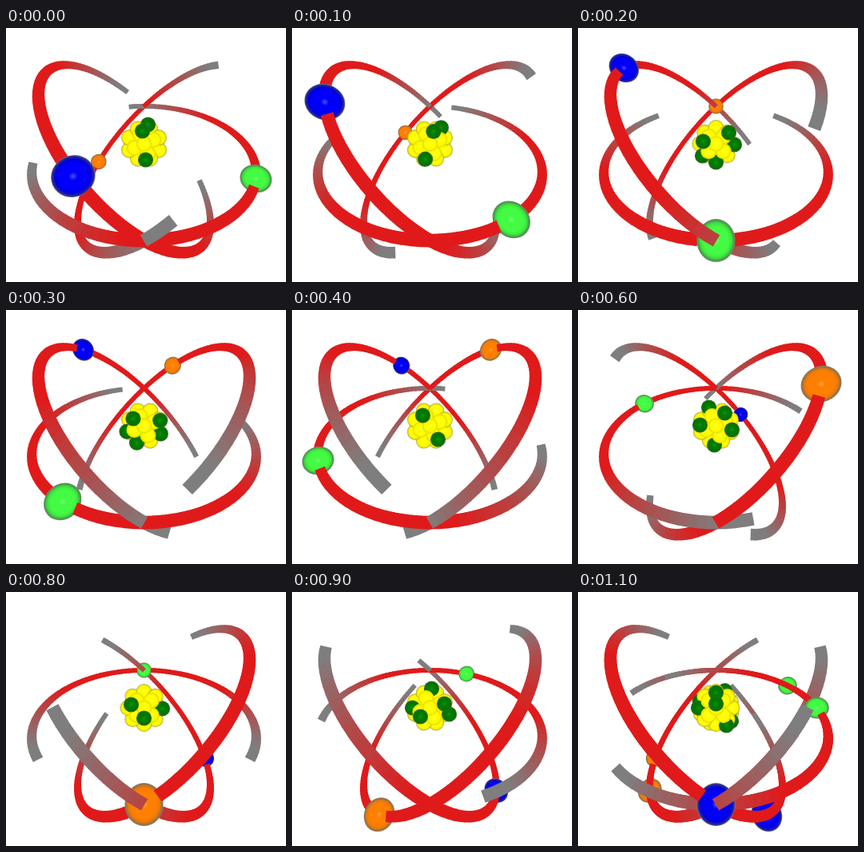
An HTML page with a canvas for the animation above (1.2 s loop, 350 px wide and 318 px high).

```html
<!DOCTYPE html>
<html lang="en">
<head>
<meta charset="utf-8">
<title>Atom</title>
<style>
  html, body { margin: 0; width: 100%; height: 100%; overflow: hidden; background: #fff; }
  canvas { display: block; }
</style>
</head>
<body>
<canvas id="stage" width="350" height="318"></canvas>
<script>
const ctx = document.getElementById('stage').getContext('2d');
const CX = 172.5, CY = 145, FOCAL = 241;
const BALL = 13.5, TUBE = 8.4, REACH = 132, STEP = 3;
const rad = deg => deg * Math.PI / 180;

// Every orbit shares the axis that points at the viewer; z is in focal lengths.
const AXIS = [0, 67.8, 0.44];
const orbits = [
  { side: [-126, 0, 0], start: -60,
    paint: ['#6cff6c', '#44fb44', '#3fe53f', '#469a46'] },
  { side: [-91.5, -75.5, 0.205], start: 30,
    paint: ['#5050ff', '#0000fa', '#0000dc', '#2c2c92'] },
  { side: [-91.5, 75.5, -0.205], start: 120,
    paint: ['#ffa040', '#ff8000', '#ee7a08', '#9c703c'] }
];

// Dark nucleons, as x, y pairs around the centre.
const poses = {
  0: [-2, -16, 5, -24, 2, 20],
  2: [16, -14, -16, -3, 0, 23, -17, 15, 23, 1],
  4: [-9, -13, 10, 17],
  6: [11, -16, -20, -1, 20, 5, -9, -23, -2, 24],
  8: [-16, -4, 0, 13, 23, 1],
  9: [18, -5, -12, 11, 2, -24, -22, 0, 24, 8],
  11: [0, -19, 0, -5, -22, 0, 13, 22]
};

function project(side, deg) {
  const c = Math.cos(rad(deg)), s = Math.sin(rad(deg));
  const [x, y, z] = AXIS.map((a, i) => a * c + side[i] * s);
  const scale = 1 / (1 - z);
  return { x: x * scale, y: y * scale, z, scale };
}

function sphere(x, y, r, stops) {
  const g = ctx.createRadialGradient(x, y, 0, x, y, r);
  stops.forEach(([at, color]) => g.addColorStop(at, color));
  ctx.fillStyle = g;
  ctx.beginPath();
  ctx.arc(x, y, r, 0, 7);
  ctx.fill();
}

function drawBall(p, [light, main, shade, rim]) {
  const angle = Math.atan2(p.y, p.x);
  ctx.save();
  ctx.translate(CX + p.x, CY + p.y);
  ctx.rotate(angle);
  ctx.scale(Math.hypot(1, Math.hypot(p.x, p.y) / FOCAL), 1);
  sphere(0, 0, BALL * p.scale, [
    [0, light], [0.2, main], [0.62, main], [0.8, shade], [0.94, rim], [1, '#808080']
  ]);
  ctx.restore();
}

function tubeColor(offset) {
  const k = Math.min(1, Math.max(0, (Math.abs(offset) - 67) / 56));
  const mix = (a, b) => Math.round(a + (b - a) * k);
  return `rgb(${mix(224, 126)},${mix(26, 126)},${mix(26, 126)})`;
}

function drawTube(a, b, color) {
  const len = Math.hypot(b.x - a.x, b.y - a.y) || 1;
  const tx = (b.x - a.x) / len, ty = (b.y - a.y) / len;
  const edge = (p, sign, extra) => {
    const lean = (p.y * tx - p.x * ty) / FOCAL;
    const h = sign * TUBE / 2 * p.scale * Math.hypot(1, lean);
    return [CX + p.x - ty * h + tx * extra, CY + p.y + tx * h + ty * extra];
  };
  ctx.fillStyle = color;
  ctx.beginPath();
  ctx.moveTo(...edge(a, 1, -0.6));
  ctx.lineTo(...edge(b, 1, 0.6));
  ctx.lineTo(...edge(b, -1, 0.6));
  ctx.lineTo(...edge(a, -1, -0.6));
  ctx.fill();
}

function drawNucleus(n) {
  const key = n in poses ? n : n - 1;
  const twist = (n - key) * 0.4;
  const c = Math.cos(twist), s = Math.sin(twist);
  const dark = [];
  for (let i = 0; i < poses[key].length; i += 2) {
    const [x, y] = poses[key].slice(i, i + 2);
    dark.push([x * c - y * s, x * s + y * c]);
  }
  const green = ([x, y]) => sphere(CX + x, CY + y, 9.6, [
    [0, '#159015'], [0.35, '#007c00'], [0.75, '#007400'], [1, '#3c6420']
  ]);
  const yellow = (angle, dist, rim) => sphere(
    CX + dist * Math.cos(angle), CY + dist * Math.sin(angle), 10,
    [[0, '#ffff30'], [0.3, '#ffff00'], [0.72, '#fdfb00'], [0.88, '#e8e000'], [1, rim]]);
  const isBack = ([x, y]) => Math.hypot(x, y) > 21.8;
  const turn = n % 3 === 2 ? 0 : Math.PI / 8;

  for (let i = 0; i < 8; i++) yellow(turn + i * Math.PI / 4, 20, '#a09850');
  dark.filter(isBack).forEach(green);
  for (let i = 0; i < 4; i++) yellow(turn + (i + 0.5) * Math.PI / 2, 13, '#eee600');
  yellow(0, 0, '#f4ee00');
  dark.filter(p => !isBack(p)).forEach(green);
}

function drawPose(n) {
  const parts = [{ z: 0, draw: () => drawNucleus(n) }];
  for (const { side, start, paint } of orbits) {
    const at = start + n * 30;
    const ball = project(side, at);
    parts.push({ z: ball.z, draw: () => drawBall(ball, paint) });
    for (let o = -REACH; o < REACH; o += STEP) {
      const mid = o + STEP / 2;
      if (Math.abs(mid) < 6) continue; // inside the ball
      const a = project(side, at + o), b = project(side, at + o + STEP);
      parts.push({ z: (a.z + b.z) / 2, draw: () => drawTube(a, b, tubeColor(mid)) });
    }
  }
  parts.sort((p, q) => p.z - q.z).forEach(p => p.draw());
}

let shown = -1;
function tick() {
  const n = Math.floor(performance.now() % 1200 / 100);
  if (n !== shown) {
    shown = n;
    ctx.fillStyle = '#fff';
    ctx.fillRect(0, 0, 350, 318);
    if (n === 11) drawPose(10); // the last pose keeps the one before it
    drawPose(n);
  }
  requestAnimationFrame(tick);
}
tick();
</script>
</body>
</html>
```
